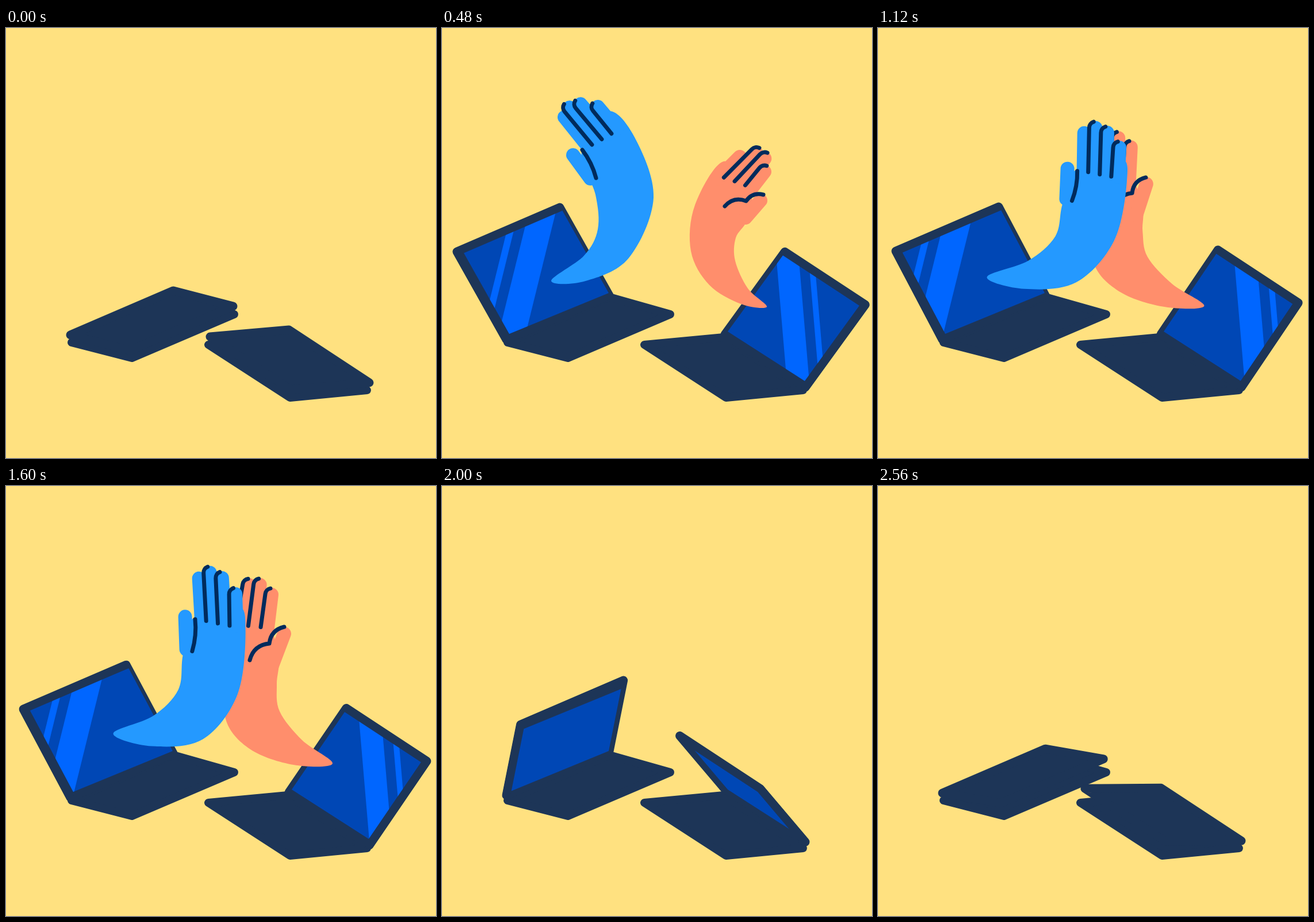
An HTML page with a canvas that plays this animation: 748x748 px, repeating every 2.64 s.

```html
<!DOCTYPE html>
<html lang="en">
<head>
<meta charset="utf-8">
<title>High five</title>
<style>
  html, body { margin: 0; height: 100%; overflow: hidden; background: #ffe180; }
  canvas { display: block; }
</style>
</head>
<body>
<canvas id="stage" width="748" height="748"></canvas>
<script>
const ctx = document.getElementById('stage').getContext('2d');
const LOOP = 2640, STEP = 80, FINGER = 12;
const NAVY = '#1d3557', SCREEN = '#0047b5', GLARE = '#0066ff', INK = '#002b5c';

// All points are flat x, y lists. Hinge and screen start at the outer side;
// shut, half and open are the lid's direction away from its hinge.
const LEFT = {
  base: [114, 547, 291, 468, 397, 498, 219, 574],
  hinge: [112, 534, 291, 457], screen: [117, 532, 290, 461],
  shut: [104, 27], half: [29, -119], open: [-81, -154],
  bands: [78, 90, 108, 155], bandY: 360, slant: -.247, slide: 33, closeAt: 1840
};
const RIGHT = {
  base: [352, 551, 490, 538, 628, 630, 494, 643],
  hinge: [632, 617, 492, 525], screen: [631, 614, 497, 528],
  shut: [-137, 12], half: [-26, -145], open: [99, -147],
  bands: [624, 663, 680, 690], bandY: 440, slant: .085, slide: -39, closeAt: 1784
};

// Body outline from the tail, arc of fingertips (first, middle, last),
// line of finger roots, thumb tip and root, crease beside the thumb.
const BLUE = {
  color: '#2499ff', lean: [-28, -27], floor: 470, reach: 290, bulge: -.1,
  clap: {
    body: [190, 434, 262, 406, 310, 364, 323, 310, 345, 252, 425, 230, 436, 270, 412, 372, 345, 443, 255, 454],
    tips: [363, 187, 393, 180, 424, 212], roots: [361, 250, 421, 262],
    thumb: [333, 248, 330, 300], crease: [350, 252, 340, 303]
  },
  raised: {
    body: [190, 440, 247, 396, 271, 350, 267, 290, 243, 214, 288, 145, 335, 190, 368, 295, 325, 400, 250, 440],
    tips: [213, 155, 230, 134, 271, 137], roots: [253, 205, 304, 176],
    thumb: [228, 221, 258, 262], crease: [244, 212, 268, 261]
  }
};
const CORAL = {
  color: '#ff8e6c', lean: [29, -24], floor: 490, reach: 330, bulge: .35,
  clap: {
    body: [568, 483, 515, 442, 476, 392, 471, 345, 474, 300, 455, 240, 400, 225, 388, 320, 382, 405, 425, 458, 500, 485],
    tips: [405, 190, 432, 170, 462, 189], roots: [390, 240, 455, 247],
    thumb: [484, 257, 462, 315], crease: [484, 245, 458, 274, 424, 303]
  },
  raised: {
    body: [565, 485, 532, 453, 510, 405, 511, 365, 530, 335, 537, 285, 490, 232, 440, 308, 433, 388, 465, 447, 520, 480],
    tips: [518, 224, 556, 221, 561, 250], roots: [480, 262, 537, 281],
    thumb: [554, 300, 528, 330], crease: [559, 290, 529, 301, 492, 310]
  }
};

// Inner end, then outer end.
const RAYS = [
  [201, 138, 152, 105], [301, 107, 269, 61], [387, 119, 384, 85], [455, 90, 465, 66],
  [526, 125, 569, 91], [557, 177, 640, 144], [235, 265, 161, 274], [611, 273, 648, 281]
];

const mix = (a, b, k) => a + (b - a) * k;
const clamp = x => Math.max(0, Math.min(1, x));
// Parabola that meets a, m and b at k = 0, .5 and 1.
const through = (a, m, b, k) => a * (1 - k) * (1 - 2 * k) + 4 * m * k * (1 - k) + b * k * (2 * k - 1);

function ramp(t, from, to) {
  const k = clamp((t - from) / (to - from));
  return k * k * (3 - 2 * k);
}

function path(p) {
  ctx.beginPath();
  for (let i = 0; i < p.length; i += 2) ctx.lineTo(p[i], p[i + 1]);
}

function fill(color) {
  ctx.fillStyle = color;
  ctx.fill();
}

function stroke(color, width) {
  ctx.strokeStyle = color;
  ctx.lineWidth = width;
  ctx.stroke();
}

function smoothLoop(p) {
  const at = i => p[(i + p.length) % p.length];
  ctx.beginPath();
  ctx.moveTo(p[0], p[1]);
  for (let i = 0; i < p.length; i += 2) {
    const before = j => at(j) + (at(j + 2) - at(j - 2)) / 6;
    const after = j => at(j + 2) - (at(j + 4) - at(j)) / 6;
    ctx.bezierCurveTo(before(i), before(i + 1), after(i), after(i + 1), at(i + 2), at(i + 3));
  }
}

function drawLaptop(l, t, glare) {
  const p = ramp(t, 0, 320) - ramp(t, l.closeAt, l.closeAt + 320) + .02 * glare * ramp(t, 240, 480);
  path(l.base);
  ctx.closePath();
  fill(NAVY);
  stroke(NAVY, 14);

  const [vx, vy] = [0, 1].map(i => through(l.shut[i], l.half[i], l.open[i], p));
  const [ax, ay, bx, by] = l.hinge.map((c, i) => c + (i % 2) * 8 * p);
  path([ax, ay, bx, by, bx + vx, by + vy, ax + vx, ay + vy]);
  ctx.closePath();
  fill(NAVY);
  stroke(NAVY, 15);

  const facing = ((bx - ax) * vy - (by - ay) * vx) * (bx - ax) < 0;
  if (!facing) return;
  const [sx, sy, ex, ey] = l.screen, k = .935 - .12 * (1 - p);
  ctx.save();
  path([sx, sy, ex, ey, ex + vx * k, ey + vy * k, sx + vx * k, sy + vy * k]);
  fill(SCREEN);
  ctx.clip();
  if (p > .9) {
    const edge = (x, y) => x + l.slide * glare + (y - l.bandY) * l.slant;
    for (let i = 0; i < l.bands.length; i += 2) {
      const [from, to] = l.bands.slice(i);
      path([edge(from, 280), 280, edge(to, 280), 280, edge(to, 660), 660, edge(from, 660), 660]);
      fill(GLARE);
    }
  }
  ctx.restore();
  path([bx + vx, by + vy, ax + vx, ay + vy, ax, ay]);
  stroke(NAVY, 14);
}

function drawArm(arm, bend, grow, push) {
  if (grow <= 0) return;
  const tail = [0, 1].map(i => mix(arm.clap.body[i], arm.raised.body[i], bend));
  const pose = key => arm.clap[key].map((c, i, all) => {
    const axis = i % 2, height = (arm.floor - all[i - axis + 1]) / arm.reach;
    const leaned = c + arm.lean[axis] * push * height;
    return mix(tail[axis], mix(leaned, arm.raised[key][i], bend), grow);
  });
  const r = FINGER * grow, ink = 7 * grow;

  smoothLoop(pose('body'));
  fill(arm.color);
  path(pose('thumb'));
  stroke(arm.color, 2 * r);

  const tips = pose('tips'), roots = pose('roots');
  for (let i = 0; i < 4; i++) {
    const [x, y] = [0, 1].map(j => through(tips[j], tips[j + 2], tips[j + 4], i / 3));
    const [rx, ry] = [0, 1].map(j => mix(roots[j], roots[j + 2], i / 3));
    path([x, y, rx, ry]);
    stroke(arm.color, 2 * r);
    if (!i) continue;
    // Ink the finger's left edge, curling over its tip.
    const angle = Math.atan2(y - ry, x - rx), side = angle - Math.PI / 2;
    ctx.beginPath();
    ctx.arc(x, y, r - 1, angle - .3, side, true);
    ctx.lineTo(rx + r * Math.cos(side), ry + r * Math.sin(side));
    stroke(INK, ink);
  }

  const c = pose('crease');
  ctx.beginPath();
  ctx.moveTo(c[0], c[1]);
  for (let i = 2; i < c.length; i += 2) {
    const [x0, y0, x1, y1] = c.slice(i - 2);
    ctx.quadraticCurveTo((x0 + x1) / 2 - (y1 - y0) * arm.bulge, (y0 + y1) / 2 + (x1 - x0) * arm.bulge, x1, y1);
  }
  stroke(INK, ink);
}

function drawRays(t) {
  const k = (t - 720) / 240;
  if (k < 0 || k >= 1) return;
  const from = Math.max(0, 1.5 * k - .5), to = Math.min(1.1, .5 + 1.5 * k);
  for (const [x0, y0, x1, y1] of RAYS) {
    path([mix(x0, x1, from), mix(y0, y1, from), mix(x0, x1, to), mix(y0, y1, to)]);
    stroke('#ffcc33', 9.5);
  }
}

function draw(now) {
  const t = Math.floor(now % LOOP / STEP) * STEP;
  const bend = 1 - ramp(t, 480, 720) + ramp(t, 1640, 1880);
  const grow = ramp(t, 240, 480) - ramp(t, 1680, 1920);
  const apart = clamp((t - 800) / 800) ** 2;
  const glare = bend + .18 * apart;

  ctx.fillStyle = '#ffe180';
  ctx.fillRect(0, 0, 748, 748);
  ctx.lineCap = ctx.lineJoin = 'round';
  drawRays(t);
  drawLaptop(LEFT, t, glare);
  drawLaptop(RIGHT, t, glare);
  drawArm(CORAL, bend, grow, apart - 1);
  drawArm(BLUE, bend, grow, apart);
  requestAnimationFrame(draw);
}
requestAnimationFrame(draw);
</script>
</body>
</html>
```
